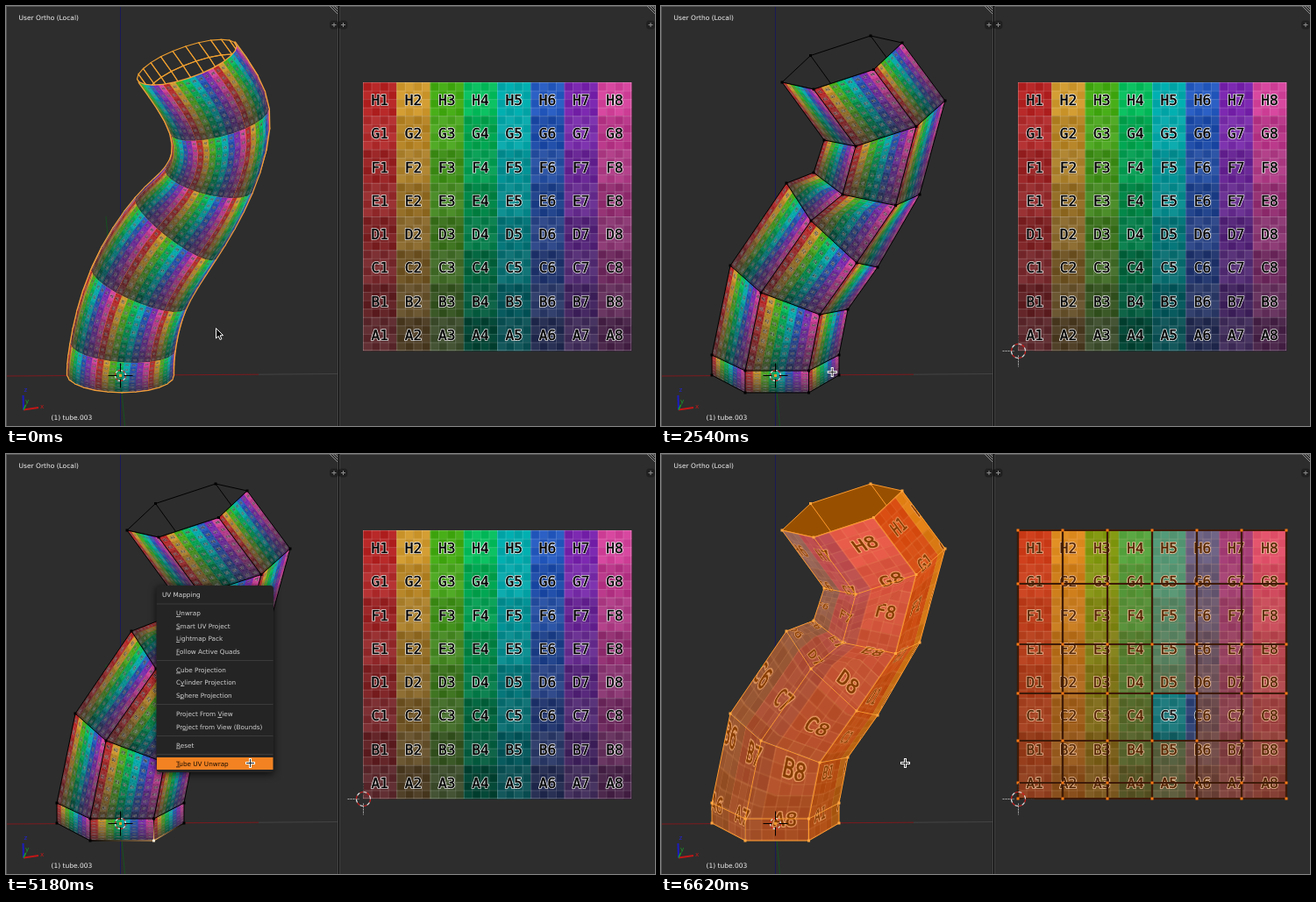
An HTML page with a canvas that plays this animation: 740 px wide and 479 px high, repeating every 8000 ms.

```html
<!DOCTYPE html>
<html lang="en">
<head>
<meta charset="utf-8">
<title>Tube UV unwrap</title>
<style>
  html, body { margin: 0; width: 100%; height: 100%; overflow: hidden; background: #2d2d2d; }
  canvas { display: block; width: 740px; height: 479px; }
</style>
</head>
<body>
<canvas id="stage" width="740" height="479"></canvas>
<script>
const W = 740, H = 479, LOOP = 8000, TAU = Math.PI * 2;
const UI = '7.25px "DejaVu Sans", sans-serif';
const VIEW = '7.5px "DejaVu Sans", sans-serif';
const UV = { x: 407, y: 87, size: 306 };
const ORANGE = '#ff9a2c';

// Every ring of the cage: left, front-left and right corner of a hexagon.
const RINGS = [
  [138, 87, 174, 95, 275, 42],
  [186, 153, 222, 160, 324, 108],
  [174, 190, 207, 215, 295, 215],
  [143, 202, 171, 245, 247, 298],
  [79, 296, 114, 327, 213, 346],
  [58, 398, 96, 416, 203, 398],
  [58, 421, 96, 441, 203, 421]
].map(([lx, ly, fx, fy, rx, ry]) => {
  const gx = fx + (rx - lx) / 2, gy = fy + (ry - ly) / 2;
  const cx = lx + rx, cy = ly + ry;
  return [[lx, ly], [fx, fy], [gx, gy], [rx, ry], [cx - fx, cy - fy], [cx - gx, cy - gy]];
});
const SEGS = RINGS.length - 1;
const ROWS = [87, 148, 217, 273, 327, 375, 393];
const ROW_V = ROWS.map(y => (y - UV.y) / UV.size);

const mix = (a, b, t) => a + (b - a) * t;

function layer(w, h, paint) {
  const c = document.createElement('canvas');
  c.width = w;
  c.height = h;
  const g = c.getContext('2d');
  g.imageSmoothingQuality = 'high';
  paint(g);
  return c;
}

function line(g, pts, color, width = 1, close = false) {
  g.beginPath();
  pts.forEach(([x, y]) => g.lineTo(x, y));
  if (close) g.closePath();
  g.strokeStyle = color;
  g.lineWidth = width;
  g.stroke();
}

function fillPoly(g, pts, color) {
  g.beginPath();
  pts.forEach(([x, y]) => g.lineTo(x, y));
  g.fillStyle = color;
  g.fill();
}

function dot(g, [x, y], color, r = 1.5) {
  g.fillStyle = color;
  g.fillRect(x - r, y - r, 2 * r, 2 * r);
}

function write(g, text, x, y, color, font = UI) {
  g.font = font;
  g.fillStyle = color;
  g.fillText(text, x, y);
}

// ---- colour grid ----
const TOP = [[184, 40, 40], [200, 146, 40], [72, 174, 24], [0, 182, 86],
             [0, 174, 176], [32, 84, 184], [124, 40, 176], [204, 60, 148]];
const LOW = [[86, 36, 40], [80, 64, 40], [56, 72, 40], [4, 72, 56],
             [8, 76, 80], [40, 48, 84], [60, 40, 84], [76, 40, 76]];

function colorGrid(g, x0, y0, size) {
  const cell = size / 8, sub = cell / 4;
  for (let r = 0; r < 32; r++) {
    for (let c = 0; c < 32; c++) {
      const row = r >> 2, col = c >> 2;
      const tint = ((row + col) % 2 ? 6 : -5) + ((r + c) % 2 ? 6 : -6);
      const rgb = TOP[col].map((v, k) => Math.max(0, Math.round(mix(v, LOW[col][k], row / 7) + tint)));
      g.fillStyle = `rgb(${rgb})`;
      g.fillRect(x0 + c * sub, y0 + r * sub, sub + .5, sub + .5);
    }
  }
  const w = size / 306;
  for (let k = 0; k <= 32; k++) {
    g.fillStyle = `rgba(255,255,255,${k % 4 ? .15 : .2})`;
    const d = Math.min(k * sub, size - w);
    g.fillRect(x0 + d, y0, w, size);
    g.fillRect(x0, y0 + d, size, w);
  }
  g.save();
  g.font = `${16.1 * w}px "DejaVu Sans Mono", monospace`;
  g.textAlign = 'center';
  g.lineJoin = 'round';
  for (let r = 0; r < 8; r++) {
    for (let c = 0; c < 8; c++) {
      const label = 'HGFEDCBA'[r] + (c + 1);
      const x = x0 + (c + .5) * cell, y = y0 + (r + .5) * cell + 6.9 * w;
      [['rgba(255,255,255,.85)', 2.1], ['#000', .4]].forEach(([color, width]) => {
        g.strokeStyle = color;
        g.lineWidth = width * w;
        g.strokeText(label, x, y);
      });
      g.fillStyle = '#000';
      g.fillText(label, x, y);
    }
  }
  g.restore();
}

const TEX = 612;
const texture = layer(TEX, TEX, g => colorGrid(g, 0, 0, TEX));

// ---- textured mesh ----
function texTri(g, p, q) {
  const [[x0, y0], [x1, y1], [x2, y2]] = p;
  const [[u0, v0], [u1, v1], [u2, v2]] = q.map(([u, v]) => [u * TEX, v * TEX]);
  const du1 = u1 - u0, dv1 = v1 - v0, du2 = u2 - u0, dv2 = v2 - v0;
  const det = du1 * dv2 - du2 * dv1;
  const solve = (d1, d2) => [(d1 * dv2 - d2 * dv1) / det, (d2 * du1 - d1 * du2) / det];
  const [a, c] = solve(x1 - x0, x2 - x0), [b, d] = solve(y1 - y0, y2 - y0);
  const cx = (x0 + x1 + x2) / 3, cy = (y0 + y1 + y2) / 3;
  g.save();
  g.beginPath();
  // grown a little so that neighbours close up
  p.forEach(([x, y]) => {
    const l = Math.hypot(x - cx, y - cy) || 1;
    g.lineTo(x + (x - cx) / l * .7, y + (y - cy) / l * .7);
  });
  g.clip();
  g.transform(a, b, c, d, x0 - a * u0 - c * v0, y0 - b * u0 - d * v0);
  g.drawImage(texture, 0, 0);
  g.restore();
}

// split along the diagonal from top right to bottom left
function texQuad(g, p, t) {
  [[0, 1, 3], [1, 2, 3]].forEach(tri => texTri(g, tri.map(k => p[k]), tri.map(k => t[k])));
}

const fullUV = (i, j, a, b) => [b, a];
const tubeUV = (i, j, a, b) => [((j + 4) % 6 + b) / 6, mix(ROW_V[i], ROW_V[i + 1], a)];

const ring = i => i < 0 ? RINGS[0].map((p, j) => p.map((v, k) => 2 * v - RINGS[1][j][k]))
  : i > SEGS ? RINGS[SEGS].map((p, j) => p.map((v, k) => 2 * v - RINGS[SEGS - 1][j][k]))
  : RINGS[i];

const basis = t => [(1 - t) ** 3 / 6, (3 * t ** 3 - 6 * t * t + 4) / 6,
                    (-3 * t ** 3 + 3 * t * t + 3 * t + 1) / 6, t ** 3 / 6];

// limit surface of the subdivided cage
function smooth(i, j, a, b) {
  const wa = basis(a), wb = basis(b), out = [0, 0];
  for (let m = 0; m < 4; m++) {
    const r = ring(i + m - 1);
    for (let n = 0; n < 4; n++) {
      const p = r[(j + n + 5) % 6], w = wa[m] * wb[n];
      out[0] += p[0] * w;
      out[1] += p[1] * w;
    }
  }
  return out;
}

const CORNERS = [[0, 0], [0, 1], [1, 1], [1, 0]];

function smoothTube(g) {
  const n = 4, front = [], back = [];
  for (let i = 0; i < SEGS; i++) {
    for (let j = 0; j < 6; j++) {
      for (let k = 0; k < n * n; k++) {
        const st = CORNERS.map(([a, b]) => [(Math.floor(k / n) + a) / n, (k % n + b) / n]);
        const p = st.map(([a, b]) => smooth(i, j, a, b));
        const t = st.map(([a, b]) => fullUV(i, j, a, b));
        const area = (p[2][0] - p[0][0]) * (p[3][1] - p[1][1]) - (p[2][1] - p[0][1]) * (p[3][0] - p[1][0]);
        if (area > 0) front.push([p, t]);
        else if (i === 0) back.push(p);
      }
    }
  }
  back.forEach(p => line(g, p, '#f0a030', 1.1, true));
  g.lineJoin = 'round';
  front.forEach(([p]) => line(g, p, '#f3a03c', 2.5, true));
  front.forEach(([p, t]) => texQuad(g, p, t));
}

function cage(g, uv, selected) {
  const edge = selected ? ORANGE : '#000';
  const top = RINGS[0];
  if (selected) fillPoly(g, top, '#985000');
  line(g, top, edge, 1, true);
  [4, 5].forEach(j => line(g, [top[j], RINGS[1][j]], edge));
  for (let i = 0; i < SEGS; i++) {
    for (let j = 0; j < 3; j++) {
      const p = CORNERS.map(([a, b]) => RINGS[i + a][j + b]);
      texQuad(g, p, CORNERS.map(([a, b]) => uv(i, j, a, b)));
      if (selected) fillPoly(g, p, 'rgba(246,110,0,.54)');
      else if (uv === tubeUV) fillPoly(g, p, 'rgba(255,255,255,.04)');
    }
  }
  RINGS.forEach(r => line(g, r.slice(0, 4), edge));
  for (let j = 0; j < 4; j++) {
    const seam = uv === tubeUV && j === 2 && !selected;
    line(g, RINGS.map(r => r[j]), seam ? '#c81818' : edge);
  }
  RINGS.forEach((r, i) => r.slice(0, i ? 4 : 6).forEach(p => dot(g, p, selected ? '#ffa640' : '#000')));
}

// ---- viewport furniture ----
function target(g, x, y, r) {
  g.lineWidth = 1.2;
  for (let k = 0; k < 12; k++) {
    g.beginPath();
    g.arc(x, y, r, k * TAU / 12, (k + 1) * TAU / 12);
    g.strokeStyle = k % 2 ? '#e8e8e8' : '#d02020';
    g.stroke();
  }
}

function plusButton(g, x, y) {
  g.beginPath();
  g.roundRect(x - 5, y - 5, 10, 10, 4);
  g.fillStyle = '#202020';
  g.fill();
  line(g, [[x - 2.5, y], [x + 2.5, y]], '#8c8c8c');
  line(g, [[x, y - 2.5], [x, y + 2.5]], '#8c8c8c');
}

function backdrop(g) {
  g.fillStyle = '#2d2d2d';
  g.fillRect(0, 0, W, H);
  line(g, [[288, 420.2], [379, 419.5]], '#444');
  line(g, [[0, 422], [288, 420.2]], '#7c1a1e');
  line(g, [[130.5, 0], [130.5, H]], '#1a1a58');
  line(g, [[114, 240], [135.5, H]], '#14521f');
}

function chrome(g) {
  target(g, 130.5, 421.5, 6);
  [[1, 0], [-1, 0], [0, 1], [0, -1]].forEach(([x, y]) =>
    line(g, [[130.5 + x * 4, 421.5 + y * 4], [130.5 + x * 14, 421.5 + y * 14]], '#000'));
  dot(g, [130.5, 421.5], '#f09a30', 1.5);

  line(g, [[20, 460.5], [37, 458]], '#c01818', 2);
  line(g, [[20, 460.5], [19.5, 444]], '#1c1cc0', 2);
  line(g, [[20, 460.5], [22.5, 455]], '#18a028', 1.5);
  write(g, 'x', 39, 459, '#c01818');
  write(g, 'z', 20.5, 440, '#2424d0');
  write(g, 'y', 22, 453, '#18a028');
  write(g, 'User Ortho (Local)', 14.5, 16, '#f0f0f0', VIEW);
  write(g, '(1) tube.003', 51.5, 472, '#f0f0f0', VIEW);

  g.fillStyle = '#555';
  g.fillRect(0, 0, W, 1);
  g.fillRect(0, 0, 1, H);
  g.fillStyle = '#444';
  g.fillRect(378, 0, 3, H);
  g.fillStyle = '#060606';
  g.fillRect(379, 0, 1, H);
  [378, 740].forEach(x => [3, 6, 9].forEach(d => line(g, [[x - d, 0], [x, d]], '#8a8a8a')));
  [374, 384.5, 735].forEach(x => plusButton(g, x, 21.5));
}

function uvCursor(g) {
  const x = UV.x + .5, y = UV.y + UV.size + .5;
  g.setLineDash([2, 1]);
  line(g, [[x - 18, y], [x - 5, y]], '#aaa');
  line(g, [[x, y + 5], [x, y + 18]], '#aaa');
  line(g, [[x, y - 18], [x, y - 5]], '#333');
  line(g, [[x + 5, y], [x + 18, y]], '#333');
  g.setLineDash([]);
  target(g, x, y, 8);
}

function uvAllStacked(g) {
  const { x, y, size: s } = UV;
  g.fillStyle = 'rgba(236,112,26,.95)';
  g.fillRect(x, y, s, s);
  g.lineWidth = 2;
  g.strokeStyle = '#1a0c04';
  g.strokeRect(x + .5, y, s - 1, s);
  g.lineWidth = 1;
  g.strokeStyle = '#e0701c';
  g.strokeRect(x + 1.5, y + 1.5, s - 3, s - 3);
  CORNERS.forEach(([a, b]) => dot(g, [x + b * s, y + a * s], '#ff7a14', 1.5));
}

function uvGridSelected(g) {
  const { x, y, size: s } = UV;
  const cols = [0, 1, 2, 3, 4, 5, 6].map(k => x + k * s / 6);
  for (let r = 0; r < 6; r++) {
    for (let c = 0; c < 6; c++) {
      const active = r === 3 && c === 3;
      g.fillStyle = active ? 'rgba(255,255,255,.06)' : 'rgba(255,114,6,.32)';
      g.fillRect(cols[c], ROWS[r], s / 6, ROWS[r + 1] - ROWS[r]);
    }
  }
  [['#140a06', 2.2], ['#80360f', .8]].forEach(([color, w]) => {
    cols.forEach(cx => line(g, [[cx, y], [cx, y + s]], color, w));
    ROWS.forEach(ry => line(g, [[x, ry], [x + s, ry]], color, w));
  });
  cols.forEach(cx => ROWS.forEach(ry => dot(g, [cx, ry], '#ff7a14', 1.5)));
}

function scene(tube, overlay, edit = true) {
  return layer(W, H, g => {
    backdrop(g);
    tube(g);
    colorGrid(g, UV.x, UV.y, UV.size);
    if (overlay) overlay(g);
    if (edit) uvCursor(g);
    chrome(g);
  });
}

const SCENES = [
  [6620, scene(g => cage(g, tubeUV, true), uvGridSelected)],
  [5240, scene(g => cage(g, tubeUV, false))],
  [1580, scene(g => cage(g, fullUV, false))],
  [500, scene(g => cage(g, fullUV, true), uvAllStacked)],
  [0, scene(smoothTube, null, false)]
];

// ---- live parts ----
function pickedVertex(g) {
  const v = RINGS[SEGS][2];
  [RINGS[SEGS][1], RINGS[SEGS][3], RINGS[SEGS - 1][2]].forEach(p => {
    const fade = g.createLinearGradient(v[0], v[1], p[0], p[1]);
    fade.addColorStop(0, '#ffc070');
    fade.addColorStop(1, '#000');
    line(g, [v, p], fade, 1.2);
  });
  dot(g, v, '#fff0d8', 1.5);
}

// label, text baseline, index of the underlined letter
const ITEMS = [
  ['Unwrap', 184, 0], ['Smart UV Project', 198.5, 0], ['Lightmap Pack', 213, 0], ['Follow Active Quads', 227.5, 0],
  ['Cube Projection', 248.5, 0], ['Cylinder Projection', 263, 1], ['Sphere Projection', 277.5, 1],
  ['Project From View', 299, 13], ['Project from View (Bounds)', 313.5, 2], ['Reset', 334.5, 0],
  ['Tube UV Unwrap', 355.5, 0]
];

function panel(g, x, y, w, h, color) {
  g.save();
  g.shadowColor = 'rgba(0,0,0,.75)';
  g.shadowBlur = 8;
  g.shadowOffsetY = 2;
  g.beginPath();
  g.roundRect(x, y, w, h, 4);
  g.fillStyle = color;
  g.fill();
  g.restore();
}

function menu(g, hot) {
  panel(g, 171.5, 150, 133.5, 213, '#242424');
  write(g, 'UV Mapping', 178, 163, '#d8d8d8');
  [171, 235.5, 285.5, 321.5, 342.5].forEach(y => line(g, [[172, y], [304.5, y]], '#3b3b3b'));
  if (hot) {
    g.fillStyle = '#f28222';
    g.fillRect(172, 346, 132.5, 14);
  }
  ITEMS.forEach(([text, y, k], n) => {
    const color = hot && n === ITEMS.length - 1 ? '#1a0c00' : '#cfcfcf';
    write(g, text, 194, y, color);
    const x = 194 + g.measureText(text.slice(0, k)).width;
    g.fillRect(x, y + 1, g.measureText(text[k]).width, .8);
  });
}

function tooltip(g) {
  panel(g, 231, 365, 312, 33, '#191919');
  write(g, 'UV unwrap a tube shaped mesh along its length, starting at the selected vertex', 237, 378, '#d8d8d8');
  write(g, 'Python: bpy.ops.mesh.tube_uv_unwrap()', 237, 391, '#8a8a8a');
}

function arrow(g, x, y) {
  g.beginPath();
  [[0, 0], [0, 11.5], [2.7, 9], [4.6, 13], [6.4, 12.2], [4.6, 8.3], [8, 8.1]]
    .forEach(([a, b]) => g.lineTo(x + a, y + b));
  g.closePath();
  g.fillStyle = '#000';
  g.fill();
  g.lineWidth = 1;
  g.strokeStyle = '#fff';
  g.stroke();
}

function cross(g, x, y) {
  [['#fff', 3, 5.5], ['#222', 1, 4.5]].forEach(([color, w, r]) => {
    line(g, [[x - r, y], [x + r, y]], color, w);
    line(g, [[x, y - r], [x, y + r]], color, w);
  });
}

const PATH = [[2120, 239.5, 369.5], [2840, 168.5, 446.5], [3020, 168.5, 446.5], [3200, 171.5, 442.5],
              [3380, 171.5, 442.5], [3800, 278.5, 353.5], [3980, 278.5, 352.5]];

function pointer(t) {
  const n = PATH.findIndex(k => k[0] > t);
  if (n === 0) return PATH[0].slice(1);
  if (n < 0) return PATH[PATH.length - 1].slice(1);
  const [t0, x0, y0] = PATH[n - 1], [t1, x1, y1] = PATH[n];
  const s = (t - t0) / (t1 - t0), e = s * s * (3 - 2 * s);
  return [mix(x0, x1, e), mix(y0, y1, e)];
}

const g = document.getElementById('stage').getContext('2d');

function draw(t) {
  const within = (a, b) => t >= a && t < b;
  g.drawImage(SCENES.find(s => t >= s[0])[1], 0, 0);
  if (within(3020, 6200)) pickedVertex(g);
  if (within(4220, 5240)) menu(g, t >= 4280);
  if (within(4700, 5180)) tooltip(g);
  if (t < 500) arrow(g, 239.5, 367.5);
  else cross(g, ...pointer(20 + Math.floor((t - 20) / 60) * 60));
}

let start;
function tick(now) {
  if (start === undefined) start = now;
  draw(Math.max(0, now - start) % LOOP);
  requestAnimationFrame(tick);
}
draw(0);
requestAnimationFrame(tick);
</script>
</body>
</html>
```
